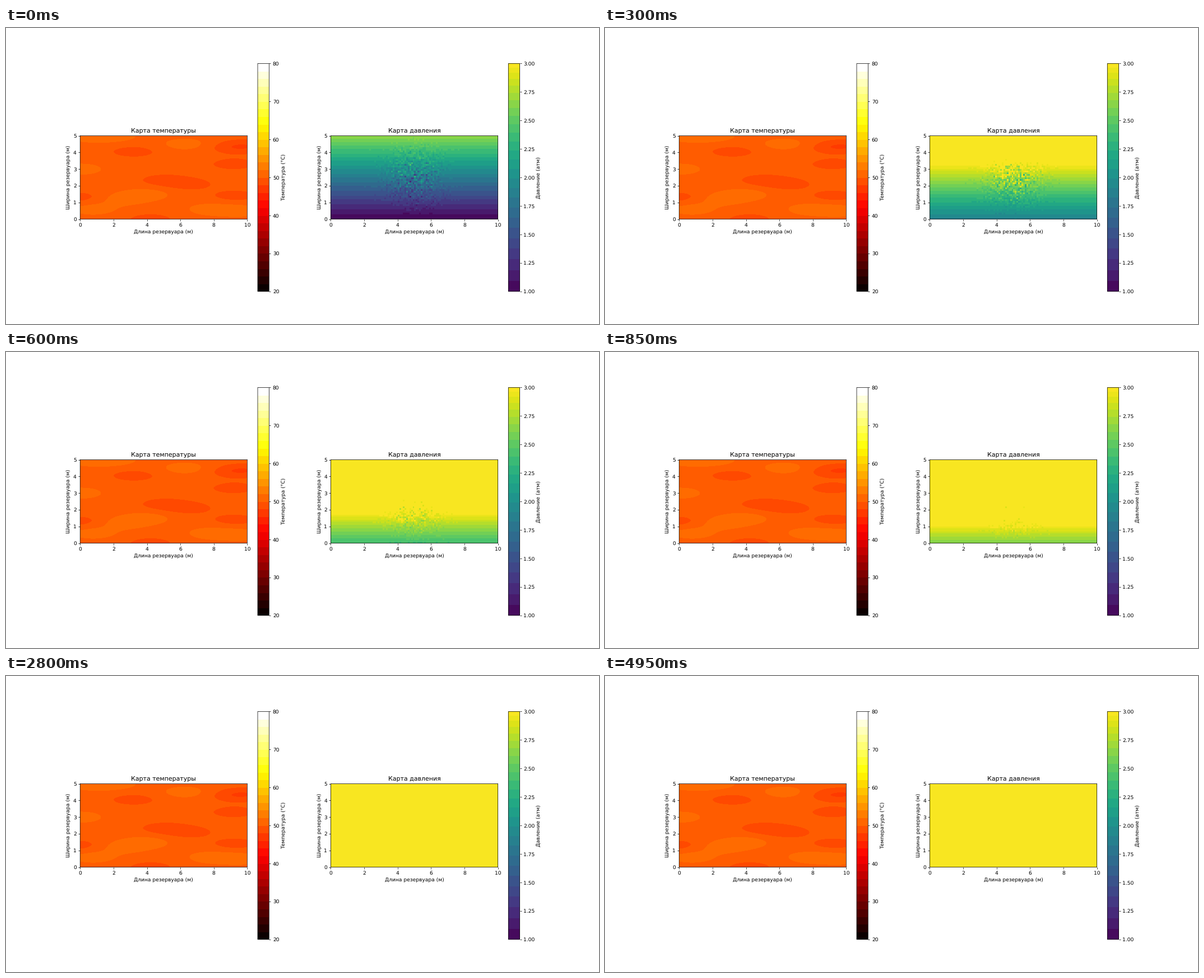
Animation of 1058 by 529 pixels, one loop 5 s. Source, as a matplotlib script:

```python
import numpy as np
import matplotlib.pyplot as plt
from matplotlib.animation import FuncAnimation
from matplotlib.cm import ScalarMappable
from matplotlib.colors import ListedColormap, Normalize

FRAMES, INTERVAL = 100, 50
LENGTH, WIDTH = 10, 5

# Soft, unsnapped lines and unhinted text
plt.rcParams.update({"font.family": "DejaVu Sans", "path.snap": False,
                     "text.hinting": "none"})

# Centres of the slightly warmer and cooler patches
WARM = [(0.5, 5), (2, 5), (6.3, 4.5), (0, 3), (2.5, 1.2), (4, 1.5),
        (0.8, 0.6), (7.8, 0.6), (9.7, 0.5)]
COOL = [(3.2, 4.05), (9.2, 4.3), (10, 4.4), (9.2, 3.3), (5, 2.35),
        (6.5, 2.1), (9.3, 1.4), (0, 1.3), (4.2, 0)]


def patches(x, y, centres):
    return sum(np.exp(-((x - cx) / 1.1) ** 2 / 2 - ((y - cy) / 0.28) ** 2 / 2)
               for cx, cy in centres)


def temperature_map():
    x, y = np.meshgrid(np.linspace(0, LENGTH, 200), np.linspace(0, WIDTH, 100))
    return x, y, 50 + 1.4 * (patches(x, y, WARM) - patches(x, y, COOL))


def banded_viridis(bands=26, size=800):
    """Viridis in flat bands that get narrower towards the top."""
    edges = 1 - (1 - np.linspace(0, 1, bands + 1)) ** 1.25
    band = np.searchsorted(edges, (np.arange(size) + 0.5) / size) - 1
    mids = (edges[:-1] + edges[1:]) / 2
    return ListedColormap(plt.get_cmap("viridis")(mids[band]))


GX, GY = np.meshgrid(np.linspace(0, LENGTH, 100), np.linspace(0, WIDTH, 50))
SPREAD = np.exp(-((GX - 5) ** 2 + (GY - 2.5) ** 2) / 2)


def pressure_map(frame):
    rng = np.random.default_rng(frame + 11)
    base = 3 - 2 * np.exp(-0.1 * frame) + GY / 3
    noise = 0.2 * SPREAD * rng.standard_normal(GX.shape)
    return np.clip(base + noise, 1, 3)


def dress(ax, title):
    ax.set_title(title)
    ax.set_xlabel("Длина резервуара (м)")
    ax.set_ylabel("Ширина резервуара (м)")
    ax.set_xticks(range(0, LENGTH + 1, 2))
    ax.set_yticks(range(WIDTH + 1))
    ax.set_aspect("equal")


fig, (ax_t, ax_p) = plt.subplots(1, 2, figsize=(16, 8), dpi=66.125)

ax_t.contourf(*temperature_map(), levels=np.arange(44.75, 56, 1.5),
              cmap="hot", vmin=20, vmax=80)
scale = ScalarMappable(Normalize(20, 80), plt.get_cmap("hot", 30))
fig.colorbar(scale, ax=ax_t, label="Температура (°C)",
             ticks=range(20, 81, 10))
dress(ax_t, "Карта температуры")

image = ax_p.imshow(pressure_map(0), origin="lower",
                    extent=(0, LENGTH, 0, WIDTH), cmap=banded_viridis(),
                    vmin=1, vmax=3, interpolation="nearest")
fig.colorbar(image, ax=ax_p, label="Давление (атм)",
             ticks=np.linspace(1, 3, 9), format="%.2f")
dress(ax_p, "Карта давления")


def update(frame):
    image.set_data(pressure_map(frame))
    return [image]


anim = FuncAnimation(fig, update, frames=FRAMES, interval=INTERVAL,
                     init_func=lambda: update(0), repeat=True, repeat_delay=0)
plt.show()
```
